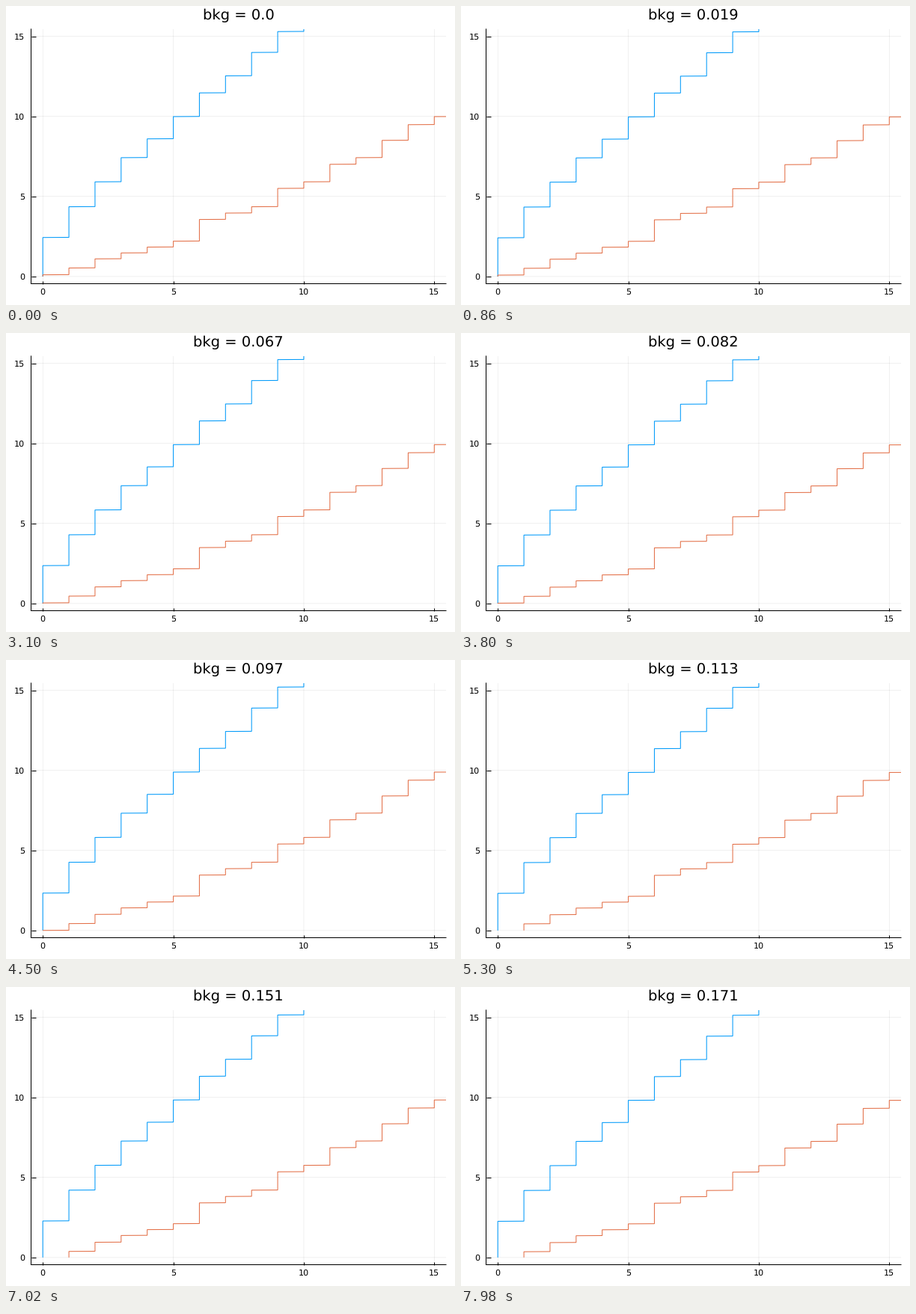
These frames come from a looping animation (600x400 px, 8000 ms). A matplotlib script:

```python
import math

import numpy as np
import matplotlib.pyplot as plt
from matplotlib.animation import FuncAnimation

W, H, DPI = 600, 400, 100
LEFT, RIGHT, TOP, BOTTOM = 33.5, 588, 30.9, 371.5
LEVEL = 0.9
STEPS = 172

plt.rcParams.update({
    "font.family": "DejaVu Sans",
    "text.hinting": "no_hinting",
})

mu = np.arange(0, 16, 0.005)
n = np.arange(36)
log_fact = np.array([math.lgamma(k + 1) for k in n])


def belt(bkg):
    """Feldman-Cousins range of counts accepted for every signal mu."""
    mean = np.maximum(mu + bkg, 1e-9)[:, None]
    best = np.maximum(np.maximum(n, bkg), 1e-9)
    prob = np.exp(n * np.log(mean) - mean - log_fact)
    log_ratio = n * np.log(mean / best) - mean + best

    order = np.argsort(-log_ratio, axis=1)
    total = np.cumsum(np.take_along_axis(prob, order, axis=1), axis=1)
    size = np.sum(total < LEVEL, axis=1) + 1
    accepted = n < size[:, None]
    low = np.where(accepted, order, len(n)).min(axis=1)
    high = np.where(accepted, order, 0).max(axis=1)

    # keep both edges rising with mu
    low = np.minimum.accumulate(low[::-1])[::-1]
    return low, np.maximum.accumulate(high)


def step_index(frame):
    """Steps last 20, 100 and 20 ms in turn."""
    cycle, tick = divmod(frame, 7)
    return 3 * cycle + (tick >= 1) + (tick >= 6)


belts = [belt(k / 1000) for k in range(STEPS)]

fig = plt.figure(figsize=(W / DPI, H / DPI), dpi=DPI, facecolor="white")
ax = fig.add_axes([LEFT / W, 1 - BOTTOM / H,
                   (RIGHT - LEFT) / W, (BOTTOM - TOP) / H])
ax.set(xlim=(-0.45, 15.45), ylim=(-0.45, 15.45),
       xticks=range(0, 16, 5), yticks=range(0, 16, 5))
ax.set_axisbelow(True)
ax.grid(color="black", alpha=0.1, lw=0.4)
plt.setp(ax.get_xgridlines() + ax.get_ygridlines(), snap=False)
ax.spines[["top", "right"]].set_visible(False)
for side in ("left", "bottom"):
    ax.spines[side].set(linewidth=0.75, snap=False)
ax.tick_params(direction="in", width=0.75, labelsize=8)
ax.tick_params(axis="x", length=3, pad=4.4)
ax.tick_params(axis="y", length=4.5, pad=6)

style = dict(lw=0.75, snap=False, solid_joinstyle="miter",
             solid_capstyle="butt")
upper_line, = ax.plot([], [], color=(0, 0.6056, 0.9787), **style)
lower_line, = ax.plot([], [], color=(0.8889, 0.4356, 0.2781), **style)
title = fig.text((LEFT + RIGHT) / 2 / W, 1 - 18 / H, "", fontsize=14,
                 ha="center", va="baseline")


def draw(frame):
    k = step_index(frame)
    low, high = belts[k]
    upper_line.set_data(low, mu)
    lower_line.set_data(high, mu)
    title.set_text(f"bkg = {k / 1000}")
    return upper_line, lower_line, title


anim = FuncAnimation(fig, draw, frames=400, interval=20, repeat=True,
                     repeat_delay=0)
plt.show()
```
